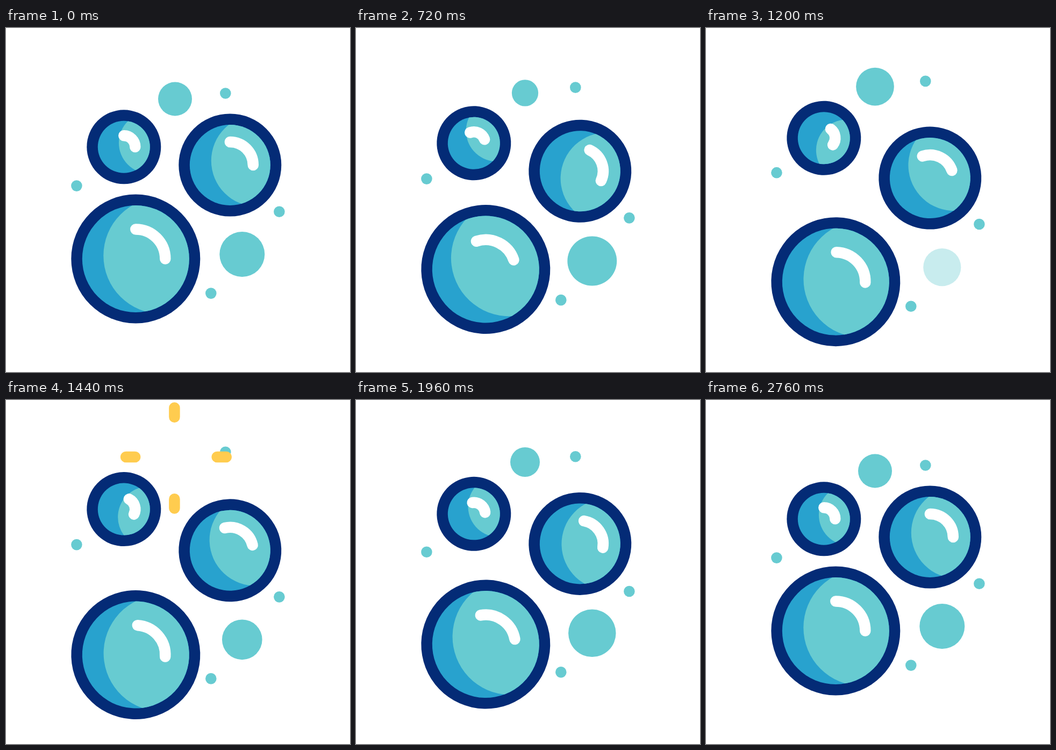
An HTML page with a canvas that plays this animation: 640 px wide and 640 px high, repeating every 2840 ms.

```html
<!DOCTYPE html>
<html lang="en">
<head>
<meta charset="utf-8">
<title>Bubbles</title>
<style>
  html, body { margin: 0; width: 100%; height: 100%; overflow: hidden; background: #fff; }
  canvas { display: block; }
</style>
</head>
<body>
<canvas id="stage" width="640" height="640"></canvas>
<script>
const ctx = document.getElementById('stage').getContext('2d');
const LOOP = 2840;
const NAVY = '#042b76', BLUE = '#28a2ce', TEAL = '#67cbd1', YELLOW = '#ffcc4f';

// Eased value through [time, value] keys, held before the first and after the last.
function track(t, keys) {
  if (t <= keys[0][0]) return keys[0][1];
  for (let i = 1; i < keys.length; i++) {
    const [t0, v0] = keys[i - 1], [t1, v1] = keys[i];
    if (t < t1) {
      const p = (t - t0) / (t1 - t0);
      return v0 + (v1 - v0) * p * p * (3 - 2 * p);
    }
  }
  return keys[keys.length - 1][1];
}

// Drift away by `amount` and back again; times are start, arrive, leave, home.
const drift = (t, amount, [start, arrive, leave, home]) =>
  track(t, [[start, 0], [arrive, amount], [leave, amount], [home, 0]]);

const bubbles = [
  { x: 219.3, y: 221.3, r: 48.5, arc: 21, light: [47.6, -7.6, 57], dy: -18.2, times: [200, 1430, 1550, 2395],
    turn: [[160, 0], [690, -20], [1280, 40], [1760, -10], [2360, 0]] },
  { x: 416.8, y: 255, r: 75, arc: 43, light: [50, -8, 85], dy: 25, times: [185, 1335, 1385, 2530],
    turn: [[160, 0], [770, 25], [1240, -20], [1900, 10], [2540, 0]] },
  { x: 241.3, y: 429.5, r: 99.5, arc: 55, light: [48.3, -6, 108.3], dy: 45, times: [183, 1365, 1365, 2655],
    turn: [[160, 0], [835, -20], [1317, 5], [1980, -10], [2660, 0]] }
];

const dots = [
  { x: 408.3, y: 121.5, dy: -24.7, times: [110, 1440, 1460, 2740] },
  { x: 131.4, y: 293.6, dy: -25, times: [100, 1310, 1345, 2480] },
  { x: 508.4, y: 341.7, dy: 24.7, times: [100, 1390, 1410, 2640] },
  { x: 381.3, y: 493.6, dy: 25, times: [100, 1340, 1380, 2560] }
];

const poppers = [
  { x: 314.5, y: 132, dy: -25, times: [100, 1440, 1460, 2740], pop: 1310, back: 1680,
    before: [[100, 31.5], [780, 24.5], [1270, 36]],
    after: [[1700, 31.5], [2150, 25], [2720, 31.5]],
    burst: [315, 107, 42, 94] },
  { x: 439.3, y: 421, dy: 25, times: [100, 1340, 1380, 2560], pop: 760, back: 1120,
    before: [[100, 42], [760, 46]],
    after: [[1150, 35], [2050, 44.5], [2700, 42]],
    burst: [440, 433, 55, 114] }
];

function disc(x, y, r, color) {
  ctx.fillStyle = color;
  ctx.beginPath();
  ctx.arc(x, y, r, 0, 2 * Math.PI);
  ctx.fill();
}

function drawBubble(t, b) {
  ctx.save();
  ctx.translate(b.x, b.y + drift(t, b.dy, b.times));
  ctx.rotate(track(t, b.turn) * Math.PI / 180);
  disc(0, 0, b.r + 20.5, NAVY);
  disc(0, 0, b.r, BLUE);
  ctx.save();
  ctx.clip();
  disc(...b.light, TEAL);
  ctx.restore();
  ctx.strokeStyle = '#fff';
  ctx.beginPath();
  ctx.arc(0, 0, b.arc, -Math.PI / 2, 0);
  ctx.stroke();
  ctx.restore();
}

function drawPopper(t, p) {
  const gone = t >= p.pop;
  if (gone && t < p.back) return;
  ctx.globalAlpha = gone ? track(t, [[p.back, 0], [p.back + 200, 1]]) : 1;
  disc(p.x, p.y + drift(t, p.dy, p.times), track(t, gone ? p.after : p.before), TEAL);
  ctx.globalAlpha = 1;
}

function drawBurst(t, { pop, burst: [x, y, near, far] }) {
  const age = t - pop;
  const tip = track(age, [[0, near], [140, far]]);
  const tail = track(age, [[40, near], [190, far]]);
  if (tip - tail < 0.01) return;
  ctx.strokeStyle = YELLOW;
  ctx.beginPath();
  for (const side of [-1, 1]) {
    ctx.moveTo(x + 1.4 + side * tail, y - 1);
    ctx.lineTo(x + 1.4 + side * tip, y - 1);
    ctx.moveTo(x - 1.6, y + 1 + side * tail);
    ctx.lineTo(x - 1.6, y + 1 + side * tip);
  }
  ctx.stroke();
}

function draw(now) {
  const t = now % LOOP;
  ctx.fillStyle = '#fff';
  ctx.fillRect(0, 0, 640, 640);
  ctx.lineWidth = 20.5;
  ctx.lineCap = 'round';
  for (const d of dots) disc(d.x, d.y + drift(t, d.dy, d.times), 10.3, TEAL);
  for (const p of poppers) drawPopper(t, p);
  for (const b of bubbles) drawBubble(t, b);
  for (const p of poppers) drawBurst(t, p);
}

const begin = performance.now();
function tick() {
  draw(performance.now() - begin);
  requestAnimationFrame(tick);
}
tick();
</script>
</body>
</html>
```
